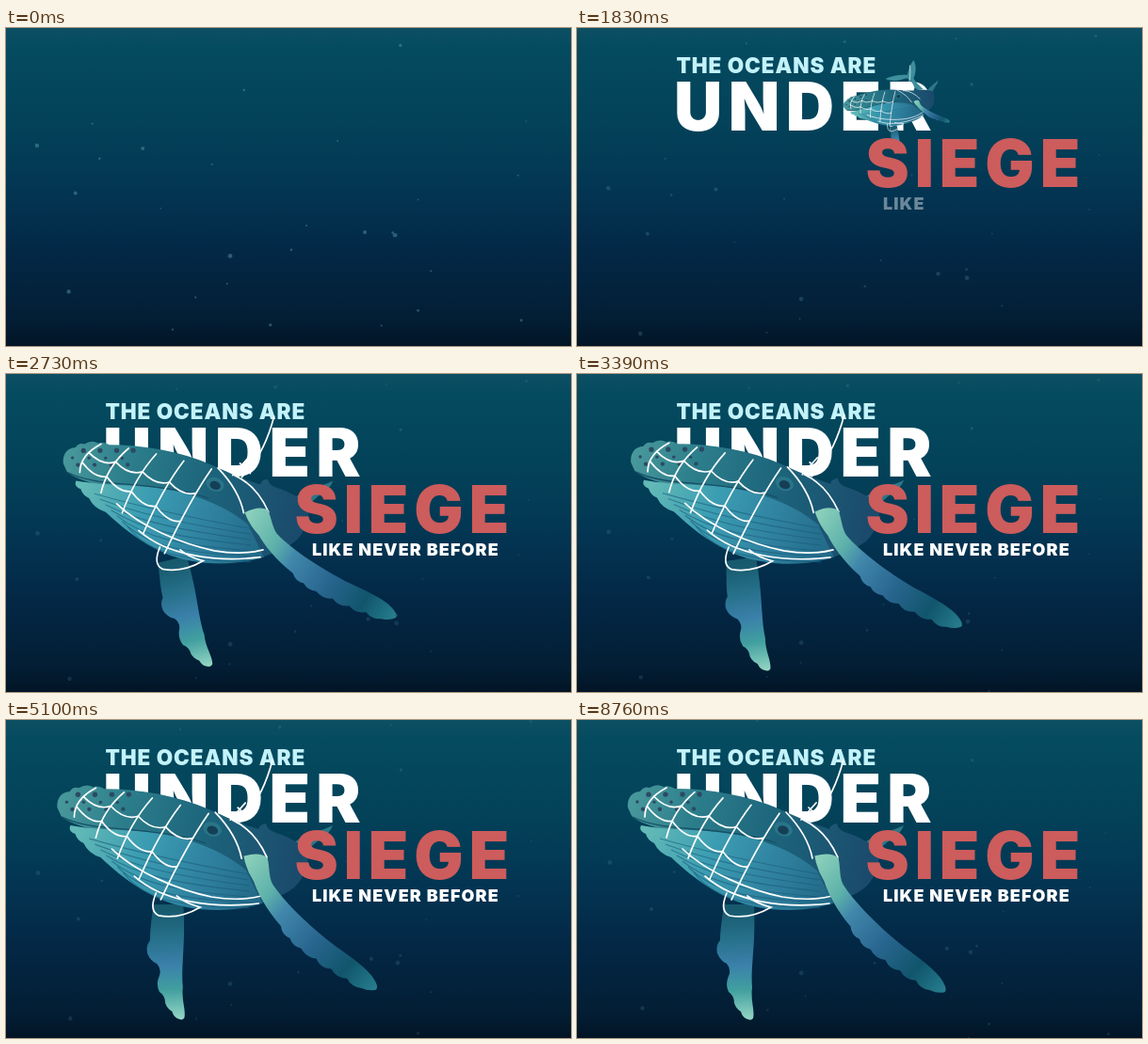
Recreate the animation shown at these times as an HTML page. Size 600 px wide and 338 px high, loop 8.79 s.

```html
<!DOCTYPE html>
<html lang="en">
<head>
<meta charset="utf-8">
<style>
html, body { margin: 0; width: 100%; height: 100%; overflow: hidden; background: #042c45; }
svg { display: block; width: 100vw; height: 100vh; }
text { font-family: Inter, "Liberation Sans", sans-serif; font-weight: 900; fill: #fff; }
.small { font-size: 22.5px; letter-spacing: .9px; fill: #c2f2fa; }
.big { font-size: 71px; letter-spacing: 6.4px; }
.red { font-size: 69.5px; letter-spacing: 5.9px; fill: #cd5c5c; }
.end { font-size: 18px; letter-spacing: 1.1px; }
#net path { fill: none; stroke: #fff; stroke-width: 1.7; stroke-linecap: round; }
#grooves path { fill: none; stroke: #1b5c7c; stroke-width: 1.2; opacity: .6; }
</style>
</head>
<body>
<svg viewBox="0 0 600 338" preserveAspectRatio="none">
  <defs>
    <linearGradient id="sea" x2="0" y2="1">
      <stop stop-color="#0d4f63"/><stop offset=".06" stop-color="#054b60"/>
      <stop offset=".3" stop-color="#034259"/><stop offset=".5" stop-color="#033653"/>
      <stop offset=".72" stop-color="#032745"/><stop offset=".92" stop-color="#031e34"/>
      <stop offset="1" stop-color="#021426"/>
    </linearGradient>
    <linearGradient id="back" gradientUnits="userSpaceOnUse" x1="58" y1="80" x2="310" y2="150">
      <stop stop-color="#48989b"/><stop offset=".25" stop-color="#2d7f8c"/>
      <stop offset=".6" stop-color="#1c647b"/><stop offset="1" stop-color="#1b4b6c"/>
    </linearGradient>
    <linearGradient id="belly" gradientUnits="userSpaceOnUse" x1="75" y1="118" x2="265" y2="190">
      <stop stop-color="#62b9b6"/><stop offset=".35" stop-color="#3b9db2"/>
      <stop offset=".7" stop-color="#2f819f"/><stop offset="1" stop-color="#226a88"/>
    </linearGradient>
    <linearGradient id="leftFin" gradientUnits="userSpaceOnUse" x1="172" y1="200" x2="176" y2="320">
      <stop stop-color="#17596d"/><stop offset=".25" stop-color="#256f88"/>
      <stop offset=".5" stop-color="#3a80aa"/><stop offset=".72" stop-color="#409f9f"/>
      <stop offset="1" stop-color="#98d8c5"/>
    </linearGradient>
    <linearGradient id="rightFin" gradientUnits="userSpaceOnUse" x1="-8" y1="8" x2="188" y2="-8">
      <stop stop-color="#8bd0bb"/><stop offset=".22" stop-color="#5db1aa"/>
      <stop offset=".34" stop-color="#4186ab"/><stop offset=".58" stop-color="#28658e"/>
      <stop offset=".8" stop-color="#11556c"/><stop offset="1" stop-color="#277f8f"/>
    </linearGradient>
  </defs>
  <rect width="600" height="338" fill="url(#sea)"/>
  <g id="specks" fill="#61a5b4"></g>

  <text class="small" x="105.5" y="47.5"><tspan>THE</tspan> <tspan>OCEANS</tspan> <tspan>ARE</tspan></text>
  <text class="big" x="103" y="109"><tspan>UNDER</tspan></text>

  <g id="whale">
    <path id="tail" fill="#3d8f9c" d="M272 116C276 94 268 82 262 74C244 72 222 74 200 54C226 52 250 58 266 66C276 50 284 40 299 30C302 52 290 72 280 82C282 96 290 108 296 122Z"/>
    <path fill="#2d7687" d="M306 130C318 121 330 120 347 112Q344 121 334 126L318 140Z"/>
    <path id="left" fill="url(#leftFin)" d="M156 196C154 212 152 224 152 234q-5 6-3 14q3 8 10 11q5 6 2 13q-4 9 0 17q6 4 6 12q2 6 7 9q2 7 7 8q4 2 6-1C189 308 184 298 186 284C184 262 190 240 188 196Z"/>
    <path fill="url(#back)" d="M54 93C53 84 58 76 67 76q4-6 10-4q8-5 15-1q6-2 12 2C140 73 182 80 216 95C238 105 254 112 268 116Q269 111 276 110Q277 116 284 119Q300 124 312 132L322 138C320 156 316 168 308 176C300 184 285 190 268 196C220 180 150 150 110 122C90 116 66 110 58 102Z"/>
    <path fill="url(#belly)" d="M68 112C100 118 140 116 165 121C200 127 235 142 255 160L272 195C235 207 190 202 165 191C135 178 115 160 100 146Q87 142 82 131Q75 128 73 121Q65 118 68 112Z"/>
    <g id="grooves"></g>
    <path fill="none" stroke="#174f68" stroke-width="1.3" d="M59 103C85 116 120 114 155 119Q190 123 212 131"/>
    <g id="bumps" fill="#2c4a63"></g>
    <ellipse cx="219" cy="116" rx="10" ry="7.5" fill="#2a7488" transform="rotate(20 219 116)"/>
    <ellipse cx="219" cy="117" rx="6" ry="4.5" fill="#143f57" transform="rotate(20 219 117)"/>
    <g id="net">
      <path d="M112 137C139 163 184 181 218 188Q249 193 271 187"/>
      <path d="M136 166C166 193 220 201 268 195"/>
      <path d="M159 184Q151 203 162 208Q184 212 206 199Q190 195 181 187"/>
      <path d="M222 98Q245 122 250 147M240 106Q264 117 277 146"/>
      <path d="M238 106L254 88M244 107L257 91M248 108L263 91M246 93L257 104"/>
      <path d="M254 101Q273 80 283 42" stroke-width="2.6"/>
    </g>
    <path id="right" fill="url(#rightFin)" d="M-12 2Q-4-14 7-15C18-8 24 0 34 1C60 5 100 2 124-2C145-6 160-9 174-8Q188-6 188-1Q184 6 176 9q-8 7-18 4q-8 8-19 5q-8 8-19 4q-8 7-19 4q-8 5-16 1q-8 4-16-2C45 24 25 18 15 13Q0 10-12 2Z"/>
  </g>

  <text class="red" x="306.5" y="168.7"><tspan>SIEGE</tspan></text>
  <text class="end" x="325" y="192.7"><tspan>LIKE</tspan> <tspan>NEVER</tspan> <tspan>BEFORE</tspan></text>
</svg>
<script>
const LOOP = 8790;
const $ = id => document.getElementById(id);
const clamp = v => Math.max(0, Math.min(1, v));
const add = (parent, name, attrs) => {
  const el = document.createElementNS('http://www.w3.org/2000/svg', name);
  for (const k in attrs) el.setAttribute(k, attrs[k]);
  return parent.appendChild(el);
};
let seed = 7;
const random = () => (seed = seed * 16807 % 2147483647) / 2147483647;

for (let i = 0; i < 12; i++)
  add($('bumps'), 'circle', { cx: 64 + 6 * i, cy: 87 + 9 * Math.sin(i * 2.1), r: 1.7 + i % 3 * .5 });

for (let i = 0; i < 7; i++)
  add($('grooves'), 'path', { d: `M${88 + i * 6} ${126 + i * 6}C${130 + i * 3} ${138 + i * 9} 180 ${150 + i * 8} 258 ${164 + i * 6}` });

// Net: curved strands across the body, joined by sagging rows
const strand = i => [[95 + 30 * i, 72 + 4 * i + .7 * i * i], [72 + 30 * i, 84 + 12 * i], [72 + 23 * i, 103 + 22 * i]];
const along = (i, u) => {
  const [a, b, c] = strand(i);
  return [0, 1].map(k => a[k] * (1 - u) ** 2 + 2 * b[k] * u * (1 - u) + c[k] * u * u);
};
for (let i = 0; i < 5; i++) {
  const [a, b, c] = strand(i);
  add($('net'), 'path', { d: `M${a}Q${b} ${c}` });
  if (i < 4) for (const u of [.35, .68]) {
    const p = along(i, u), q = along(i + 1, u);
    add($('net'), 'path', { d: `M${p}Q${(p[0] + q[0]) / 2} ${(p[1] + q[1]) / 2 + 10} ${q}` });
  }
}

const specks = Array.from({ length: 28 }, () => {
  const r = .8 + 1.8 * random() ** 2;
  return { x: 600 * random(), y: 342 * random(), r, el: add($('specks'), 'circle', { r }) };
});

const words = [...document.querySelectorAll('tspan')];

// A fin's fast stroke, then its slow return to rest, in degrees
const swing = (s, from, depth) => (from + depth) * Math.exp(-s / .3) - depth * Math.exp(-s / .8);

function draw(t) {
  words.forEach((el, i) => el.setAttribute('fill-opacity', clamp((t - 935 - i * 165) / 170)));

  const s = t / 1000;
  const sink = 52 * (1 - Math.exp(-s / .6)) - 3 * s;
  specks.forEach(({ x, y, r, el }, i) => {
    el.setAttribute('cx', x + s * (1 + Math.sin(i * 2.3)));
    el.setAttribute('cy', (y + sink * (.7 + r / 7) + 342) % 342);
  });
  $('specks').setAttribute('opacity', .42 - .24 * clamp(t / 2500));

  const u = clamp((t - 1570) / 630);
  const away = 1 - u * u * (3 - 2 * u);
  const settle = Math.exp(-Math.max(0, t - 2000) / 900);
  const size = (1 - away) * (1 - .05 * settle);
  $('whale').setAttribute('transform',
    `translate(${320 + 87 * away + 2 * settle} ${130 - 108 * away + 2.5 * settle}) rotate(${-32 * away}) scale(${size}) translate(-320 -130)`);

  const after = Math.max(0, s - 2.22);
  const finSize = 1 - .6 * away;
  const leftTurn = swing(after, -6.2, 37) + 22 * away;
  const rightTurn = 47.2 + swing(after, 12.8, 40) - 15 * away;
  $('left').setAttribute('transform', `translate(178 195) rotate(${leftTurn}) scale(${finSize}) translate(-178 -195)`);
  $('right').setAttribute('transform', `translate(262 152) rotate(${rightTurn}) scale(${finSize})`);
  $('tail').setAttribute('opacity', clamp(away * 2));
}

const start = performance.now();
function tick() {
  draw((performance.now() - start) % LOOP);
  requestAnimationFrame(tick);
}
tick();
</script>
</body>
</html>
```
